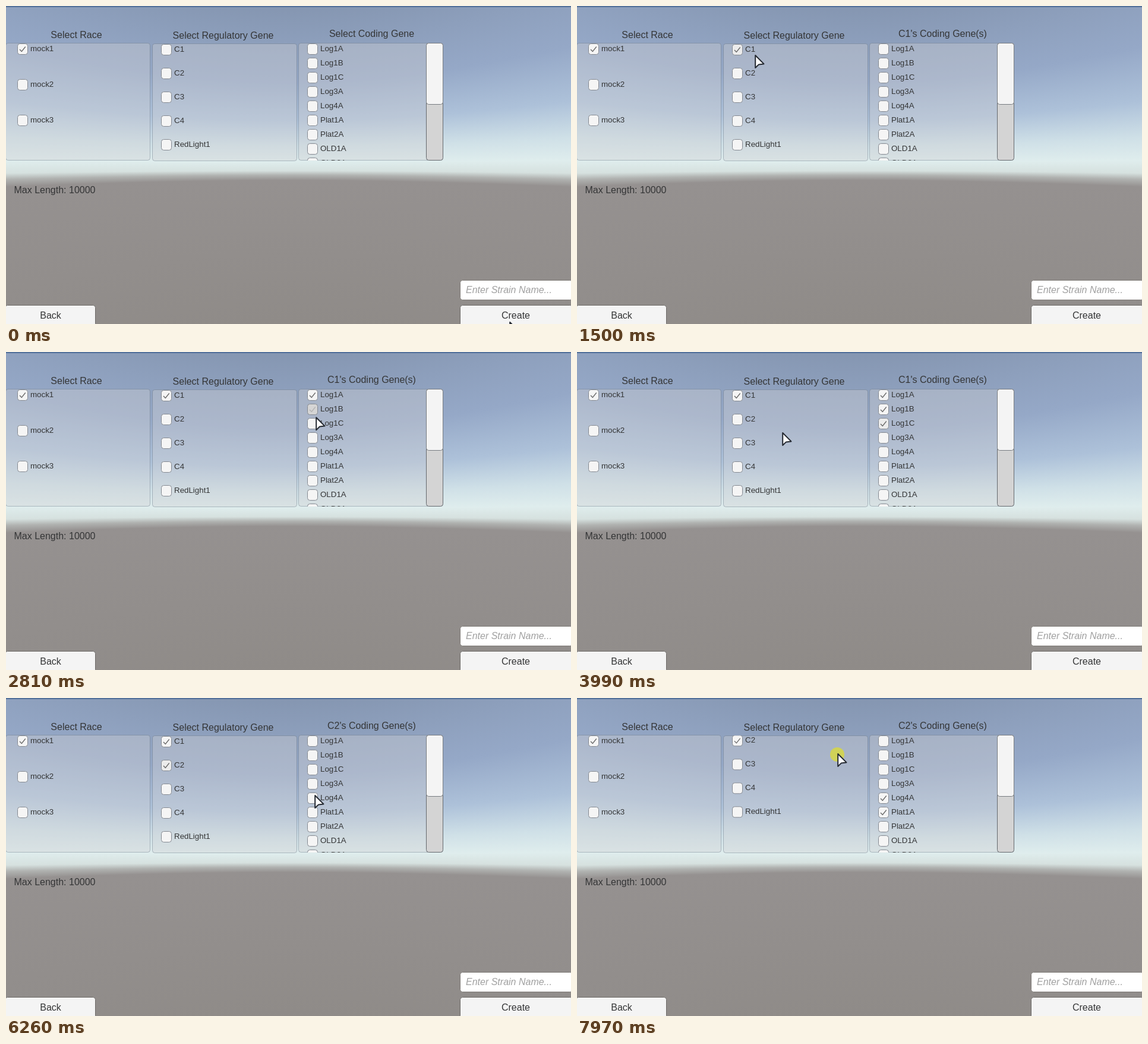
Recreate the animation shown at these times as an HTML page with a canvas. Size 951 by 535 pixels, loop 8 s.

```html
<!DOCTYPE html>
<html lang="en">
<head>
<meta charset="utf-8">
<title>Strain editor</title>
<style>
  html, body { margin: 0; width: 100%; height: 100%; overflow: hidden; background: #918d89; }
  canvas { display: block; }
</style>
</head>
<body>
<canvas id="stage" width="951" height="535"></canvas>
<script>
const W = 951, H = 535, LOOP = 8000, PRESS = 150, FADE = 100;
const canvas = document.getElementById('stage');
const ctx = canvas.getContext('2d');
const FONT = '"Liberation Sans", Arial, sans-serif';
const INK = '#343536';

const races = ['mock1', 'mock2', 'mock3'];
const regulators = ['C1', 'C2', 'C3', 'C4', 'RedLight1'];
const coders = ['Log1A', 'Log1B', 'Log1C', 'Log3A', 'Log4A', 'Plat1A', 'Plat2A', 'OLD1A', 'OLD2A'];

// Eased pointer glides: arrival time, duration, tip x, tip y
const home = [847, 530];
const glides = [
  [720, 670, 250, 60], [1030, 310, 272, 83], [1500, 150, 299, 81], [1660, 150, 511, 80],
  [2100, 230, 521, 77], [2500, 200, 521, 98], [2890, 160, 521, 118],
  [3990, 260, 345, 134], [4380, 370, 289, 118],
  [6090, 390, 543, 161], [6260, 170, 519, 162], [6700, 140, 519, 184],
  [7110, 230, 445, 198], [7270, 110, 431, 193], [7960, 310, 438, 92]
];

// When each toggle is pressed
const presses = { C1: 1195, Log1A: 2110, Log1B: 2630, Log1C: 3035, C2: 5535, Log4A: 6405, Plat1A: 6715 };
const FIRST = presses.C1 + PRESS, SWAP = presses.C2 + PRESS, DRAG = 7645;

const clamp = v => Math.max(0, Math.min(1, v));
const mix = (a, b, k) => a + (b - a) * k;
const ease = k => k * k * (3 - 2 * k);

function pointer(t) {
  let [x, y] = home;
  for (const [end, ms, toX, toY] of glides) {
    const k = ease(clamp(1 - (end - t) / ms));
    x = mix(x, toX, k);
    y = mix(y, toY, k);
  }
  return [x, y];
}

function box(x, y, w, h, fill, stroke) {
  ctx.beginPath();
  ctx.roundRect(x + .5, y + .5, w - 1, h - 1, 4);
  ctx.fillStyle = fill;
  ctx.fill();
  ctx.strokeStyle = stroke;
  ctx.lineWidth = 1;
  ctx.stroke();
}

function text(s, x, y, size = 16, align = 'left', color = INK, style = '') {
  ctx.font = `${style} ${size}px ${FONT}`;
  ctx.textAlign = align;
  ctx.fillStyle = color;
  ctx.fillText(s, x, y);
}

// Sky dome seen in perspective: equal elevations spread from the mid line towards the sides
const backdrop = (() => {
  const c = document.createElement('canvas');
  c.width = W;
  c.height = H;
  const g = c.getContext('2d');
  const dome = g.createLinearGradient(0, 0, 0, H);
  const stops = {
    0: '#8596b1', .24: '#95a8c7', .36: '#adc1d9', .44: '#cfe0e7', .49: '#dfeded',
    .518: '#d6e1df', .532: '#b0b2b0', .548: '#959190', 1: '#8f8b88'
  };
  for (const at in stops) dome.addColorStop(+at, stops[at]);
  g.fillStyle = dome;
  const focal = H / 2 * Math.sqrt(3);
  for (let x = 0; x < W; x++) {
    const k = Math.hypot(1, (x - W / 2) / focal);
    g.setTransform(1, 0, 0, k, 0, H / 2 * (1 - k));
    g.fillRect(x, 0, 1, H);
  }
  g.resetTransform();
  g.fillStyle = '#52709a';
  g.fillRect(0, 0, W, 2);
  return c;
})();

function checkAlpha(name, t) {
  if (name === 'mock1') return 1;
  if (!(name in presses)) return 0;
  const on = clamp((t - presses[name] - PRESS) / FADE);
  const off = name.startsWith('Log1') ? clamp((t - SWAP) / FADE) : 0;
  return on - off;
}

// Grey level of a toggle: idle, pressed, then selected until the next press
function shade(name, t) {
  const since = t - presses[name];
  const moved = t >= DRAG || Object.values(presses).some(p => p <= t && p > presses[name]);
  if (!(since >= 0) || moved) return 245;
  return since < PRESS ? mix(245, 203, clamp(.5 + since / FADE))
                       : mix(203, 236, clamp((since - PRESS) / FADE));
}

function toggle(name, x, y, t) {
  const v = Math.round(shade(name, t));
  box(x, y, 18, 19, `rgb(${v},${v},${v})`, '#858a92');
  ctx.globalAlpha = checkAlpha(name, t);
  ctx.strokeStyle = '#6a6a6a';
  ctx.lineWidth = 1.3;
  ctx.beginPath();
  ctx.moveTo(x + 4, y + 10);
  ctx.lineTo(x + 7.3, y + 13.5);
  ctx.lineTo(x + 13.7, y + 5.5);
  ctx.stroke();
  ctx.globalAlpha = 1;
  text(name, x + 22, y + 13, 13.33);
}

function panel(names, x, y, boxX, step, t, shift = 0) {
  box(x, y, 244, 198, 'rgba(208,208,210,.38)', 'rgba(95,110,125,.4)');
  ctx.save();
  ctx.beginPath();
  ctx.rect(x, y, 244, 198);
  ctx.clip();
  names.forEach((name, i) => toggle(name, boxX, y + 1 + i * step + shift, t));
  ctx.restore();
}

// Rubber-band offset of a list pulled past its end
function stretch(pull, size) {
  return -size * (1 - 1 / (pull * .55 / size + 1));
}

function cursor(x, y, pressed) {
  if (pressed) {
    ctx.fillStyle = 'rgba(220,218,55,.77)';
    ctx.beginPath();
    ctx.arc(x, y + 3, 12, 0, 7);
    ctx.fill();
  }
  ctx.beginPath();
  ctx.moveTo(x + 1.2, y + 2);
  ctx.lineTo(x + 1.2, y + 23);
  ctx.lineTo(x + 7, y + 17.4);
  ctx.lineTo(x + 15.5, y + 16.4);
  ctx.closePath();
  ctx.lineJoin = 'round';
  ctx.lineWidth = 2;
  ctx.strokeStyle = '#252a32';
  ctx.fillStyle = '#fff';
  ctx.fill();
  ctx.stroke();
}

function draw(t) {
  const [x, y] = pointer(t);
  ctx.drawImage(backdrop, 0, 0);

  const title = t < FIRST ? 'Select Coding Gene' : `${t < SWAP ? 'C1' : 'C2'}'s Coding Gene(s)`;
  text('Select Race', 118.5, 54, 16, 'center');
  text('Select Regulatory Gene', 365.5, 55, 16, 'center');
  text(title, 615.5, 52, 16, 'center');

  const shift = t > DRAG ? stretch((193 - y) * .95, 198) : 0;
  panel(races, -1, 62, 19, 60, t);
  panel(regulators, 246, 63, 261, 40, t, shift);
  panel(coders, 492, 62, 507, 24, t);

  box(707, 62, 29, 198, '#d4d4d4', '#65696e');
  box(707, 62, 29, 104, '#f4f4f4', '#777b80');

  text('Max Length: 10000', 13.5, 315);
  box(764, 461, 190, 34, '#fff', '#7d7975');
  text('Enter Strain Name...', 774, 483, 16, 'left', '#a0a0a0', 'italic');
  box(-2, 503, 153, 36, '#f4f4f4', '#6c6966');
  box(764, 503, 190, 36, '#f4f4f4', '#6c6966');
  text('Back', 75, 526, 16, 'center');
  text('Create', 858, 526, 16, 'center');

  const held = Object.values(presses).some(p => t >= p && t < p + PRESS);
  cursor(x, y, held || t >= DRAG);
}

const start = performance.now();
function tick() {
  draw((performance.now() - start) % LOOP);
  requestAnimationFrame(tick);
}
tick();
</script>
</body>
</html>
```
